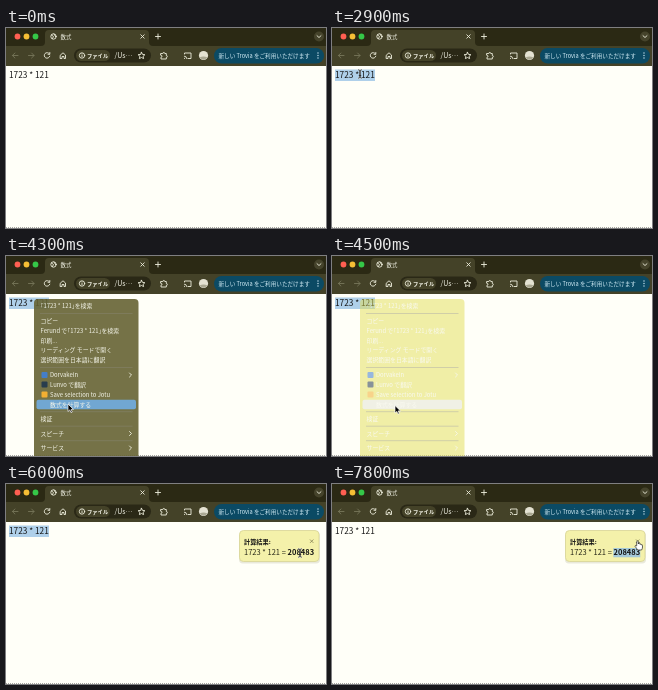
An HTML page for the animation above (8 s loop, 320x200 px).

```html
<!DOCTYPE html>
<html lang="ja">
<head>
<meta charset="utf-8">
<style>
html, body { margin: 0; width: 100%; height: 100%; overflow: hidden; background: #fffff8; }
svg { display: block; width: 100vw; height: 100vh; }
text { font-family: "Noto Sans CJK JP", "Noto Sans CJK", "Noto Sans", sans-serif; font-feature-settings: "halt"; white-space: pre; }
.line { fill: none; stroke: #eeeedc; stroke-width: .9; stroke-linecap: round; stroke-linejoin: round; }
.dim { stroke: #77755a; }
.ui { fill: #f4f4e8; font-size: 6px; }
</style>
</head>
<body>
<svg viewBox="0 0 320 200">
  <rect width="320" height="200" fill="#fffff8"/>
  <path d="M0 199.5H320" stroke="#a5a5a0" stroke-dasharray="1 1"/>

  <!-- Browser frame -->
  <rect width="320" height="18" fill="#2b2914"/>
  <path d="M35 18Q39 18 39 14V6Q39 2 43 2H139Q143 2 143 6V14Q143 18 147 18H320V38H0V18Z" fill="#444228"/>
  <circle cx="11.5" cy="8.5" r="2.9" fill="#ff5f52"/>
  <circle cx="20.5" cy="8.5" r="2.9" fill="#f6be35"/>
  <circle cx="29.5" cy="8.5" r="2.9" fill="#35c748"/>
  <circle cx="47.5" cy="8.5" r="2.7" class="line"/>
  <path class="line" d="M45.5 7L47.5 8.5L46.5 10.5M48 6L49.5 8.5"/>
  <text class="ui" x="54.5" y="10.5" font-size="5.4" style="font-size:5.4px">数式</text>
  <path class="line" d="M134.8 6.8l3.4 3.4m0-3.4l-3.4 3.4M149.5 8.5h5m-2.5-2.5v5"/>
  <circle cx="313" cy="8.5" r="5" fill="#45432b"/>
  <path class="line" d="M311 7.7l2 1.8l2-1.8"/>

  <path class="line dim" d="M12 27.5H6.5m2.4-2.5l-2.5 2.5l2.5 2.5M22.5 27.5H28m-2.4-2.5l2.5 2.5l-2.5 2.5"/>
  <path class="line" d="M43.4 25.8A2.8 2.8 0 1 0 43.8 28.2M43.8 24.5v1.8h-1.8"/>
  <path class="line" d="M54.5 27L57 24.8L59.5 27V30.5H58V28.5H56V30.5H54.5Z"/>
  <rect x="68" y="20.5" width="77" height="14" rx="7" fill="#2a2816"/>
  <rect x="70" y="22" width="34" height="11" rx="5.5" fill="#444228"/>
  <circle class="line" cx="76" cy="27.5" r="2.7"/>
  <path class="line" d="M76 27.4v1.3M76 26v.1"/>
  <text class="ui" x="81" y="29.6" style="font-size:5.3px;font-weight:bold">ファイル</text>
  <text class="ui" x="108.5" y="30" style="font-size:7px">/Us…</text>
  <path class="line" d="M135.5 24.3l1 2.1l2.4.3l-1.8 1.6l.5 2.3l-2.1-1.1l-2.1 1.1l.5-2.3l-1.8-1.6l2.4-.3Z"/>
  <path class="line" d="M155 25.5h1.8a1 1 0 1 1 2 0h1.5v2a1 1 0 1 1 0 2v1.5H155v-1.8a1 1 0 1 0 0-2Z"/>
  <path class="line" d="M178.5 26V25h6.5v5.5h-3M178.5 30.5v-.2M178.5 28.2a2.2 2.2 0 0 1 2.2 2.2"/>
  <circle cx="197.5" cy="27.5" r="4.6" fill="#e4e2d2"/>
  <path d="M193.6 29.5q3.9-2.2 7.8 0a4.6 4.6 0 0 1-7.8 0" fill="#aaa892"/>
  <rect x="208" y="20" width="110" height="15.5" rx="7.7" fill="#0b4a64"/>
  <text class="ui" x="212.5" y="29.7" style="font-size:5.6px;fill:#d4eef8">新しい Trovia をご利用いただけます</text>
  <path d="M312 25v.1m0 2.4v.1m0 2.4v.1" stroke="#d4eef8" stroke-width="1.3" stroke-linecap="round"/>

  <!-- Page -->
  <rect id="pageSel" x="3" y="41.5" height="11.5" fill="#afd0ea"/>
  <text x="3" y="50.2" font-size="8.3" fill="#151515">1723 * 121</text>

  <g id="popup">
    <rect x="233" y="47.5" width="81" height="32" rx="4" fill="#55551a" opacity=".13"/>
    <rect x="233.5" y="46.5" width="79.5" height="31" rx="4" fill="#f4f1aa" stroke="#d8d596" stroke-width=".8"/>
    <rect id="sumSel" x="281.3" y="64" width="27" height="9.3" fill="#a5c9d8"/>
    <text x="238" y="59.5" font-size="6.2" font-weight="bold" fill="#151515">計算結果:</text>
    <path d="M304 55.5l3.4 3.4m0-3.4l-3.4 3.4" stroke="#77754a" stroke-width=".7"/>
    <text x="238" y="71.2" font-size="7.5" fill="#252515">1723 * 121 = <tspan font-weight="bold" fill="#111">208483</tspan></text>
  </g>

  <g id="menu">
    <path id="panel" d="M28 200V47Q28 43 32 43H128.500Q132.500 43 132.500 47V200Z"/>
    <rect id="hover" x="30.500" width="99.500" height="9.600" rx="2"/>
    <g id="items"></g>
  </g>

  <!-- Pointers, each with its hot spot at 0,0 -->
  <g id="beam" fill="none" stroke-linecap="round">
    <path d="M-1.500-4.200Q0-4.200 0-3V3Q0 4.200-1.500 4.200M1.500-4.200Q0-4.200 0-3V3Q0 4.200 1.500 4.200" stroke="#fff" stroke-width="1.600" opacity=".7"/>
    <path d="M-1.500-4.200Q0-4.200 0-3V3Q0 4.200-1.500 4.200M1.500-4.200Q0-4.200 0-3V3Q0 4.200 1.500 4.200M-.8 1.500H.8" stroke="#222" stroke-width=".8"/>
  </g>
  <path id="arrow" d="M0 0V7.500L1.800 5.900L3 8.600L4.300 8L3.100 5.400H5.500Z" fill="#000" stroke="#fff" stroke-width=".7"/>
  <path id="hand" d="M-.8 4.500V.6Q0-.5.8.6V3Q2-.0 2.400 3.300Q3.600 2.500 3.800 3.800Q5 3.200 5 4.800V6Q5 7.500 4.100 9H0Q-.7 7.300-2.500 5.300Q-2.400 3.800-.8 4.900Z" fill="#fff" stroke="#222" stroke-width=".7"/>
</svg>
<script>
const LOOP = 8000;
const $ = id => document.getElementById(id);
const show = (id, on) => $(id).style.display = on ? '' : 'none';
const clamp = v => Math.max(0, Math.min(1, v));
const span = (t, a, b) => clamp((t - a) / (b - a));
const ease = p => p * p * (3 - 2 * p);
const mix = (a, b, p) => `rgb(${a.map((v, i) => v + (b[i] - v) * p)})`;

// label, centre y, icon colour ('' indents only), submenu
const rows = [
  ['「1723 * 121」を検索', 50],
  ['コピー', 65],
  ['Ferund で「1723 * 121」を検索', 75],
  ['印刷...', 84.5],
  ['リーディング モードで開く', 94],
  ['選択範囲を日本語に翻訳', 104],
  ['Dorvakeln', 119, '#2f70c4', true],
  ['Lunvo で翻訳', 128.5, '#10263a'],
  ['Save selection to Jotu', 138.5, '#f2a71c'],
  ['数式を計算する', 148.5, ''],
  ['検証', 163],
  ['スピーチ', 177.5, undefined, true],
  ['サービス', 192, undefined, true]
];
$('items').innerHTML = rows.map(([label, y, icon, sub]) =>
  (icon ? `<rect x="35.5" y="${y - 3}" width="6" height="6" rx="1" fill="${icon}"/>` : '') +
  `<text class="ui" x="${icon === undefined ? 34.5 : 44}" y="${y + 2.2}" style="font-size:5.9px">${label}</text>` +
  (sub ? `<path class="line" d="M123.5 ${y - 2}l2 2l-2 2"/>` : '')
).join('') + [57.5, 111.5, 155.7, 170.2, 184.7].map(y =>
  `<path d="M34 ${y}H126.500" stroke="#77755a" stroke-width=".6"/>`).join('');

// time, x, y of the pointer
const path = [
  [300, 44, 57], [900, 5, 48], [1200, 4.5, 47], [1600, 4.5, 47], [2400, 43, 50],
  [2550, 43, 50], [2900, 28, 46], [3200, 28, 46], [3600, 57, 126], [3900, 62, 148],
  [4300, 62, 148], [4500, 63, 149.5], [4900, 63, 149.5], [5750, 240, 105],
  [6000, 294, 69], [7000, 294, 69], [7650, 305.500, 57], [LOOP, 305.500, 57]
];
function pointerAt(t) {
  const i = Math.max(1, path.findIndex(k => k[0] > t));
  const [a, b] = [path[i - 1], path[i]];
  const p = ease(span(t, a[0], b[0]));
  return [a[1] + (b[1] - a[1]) * p, a[2] + (b[2] - a[2]) * p];
}

function draw(t) {
  const [x, y] = pointerAt(t);

  const selecting = t >= 1600 && t < 6400;
  show('pageSel', selecting);
  $('pageSel').setAttribute('width', t < 2400 ? Math.max(0, Math.min(40, x - 3)) : 40);

  const fade = span(t, 4250, 4750);
  const tint = clamp(fade * 2);
  show('menu', t >= 3100 && fade < 1);
  $('menu').setAttribute('opacity', 1 - fade);
  $('panel').setAttribute('fill', mix([70, 68, 43], [225, 221, 85], tint));
  const row = rows.find(r => Math.abs(r[1] - y - 1) <= 5);
  show('hover', row && t > 3250);
  if (row) $('hover').setAttribute('y', row[1] - 4.8);
  $('hover').setAttribute('fill', mix([65, 141, 205], [225, 225, 210], tint));

  show('popup', t >= 4800);
  show('sumSel', t >= 6400);

  const kind = t < 300 ? '' : t < 3100 ? 'beam' : t < 5900 ? 'arrow'
    : t < 7300 ? 'beam' : t < 7550 ? 'arrow' : 'hand';
  for (const id of ['beam', 'arrow', 'hand']) {
    show(id, id === kind);
    $(id).setAttribute('transform', `translate(${x} ${y})`);
  }
}

const start = performance.now();
function tick() {
  draw((performance.now() - start) % LOOP);
  requestAnimationFrame(tick);
}
tick();
</script>
</body>
</html>
```
